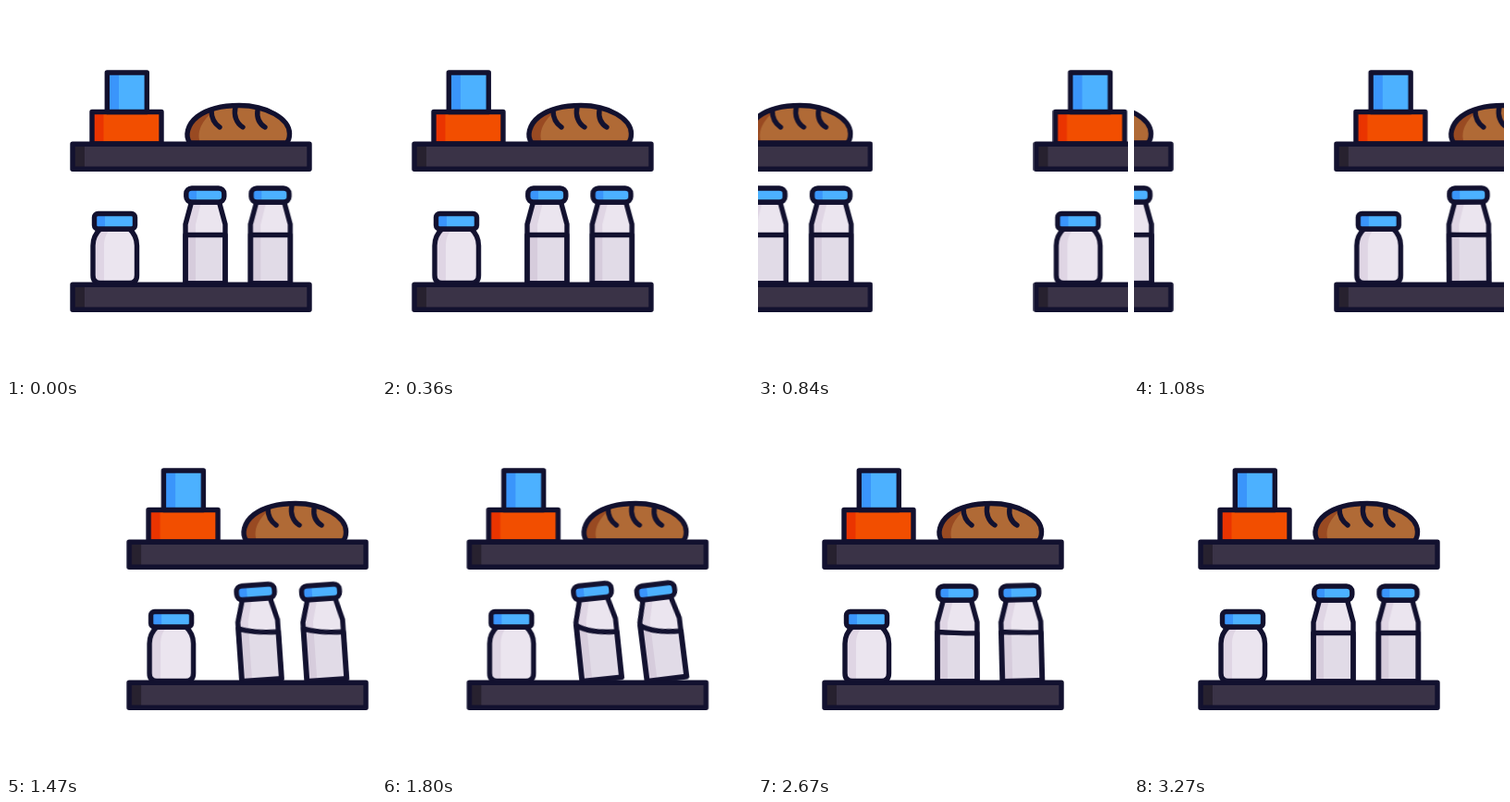
Animation of 400x400 px, one loop 4330 ms. Source, as an HTML page:

```html
<!DOCTYPE html>
<html lang="en">
<head>
<meta charset="utf-8">
<title>Pantry shelves</title>
<style>
  html, body { margin: 0; width: 100%; height: 100%; overflow: hidden; background: #fff; }
  svg { display: block; width: 100%; height: 100%; }

  .ink { stroke: #12112f; stroke-width: 5.4; stroke-linejoin: round; stroke-linecap: round; }
  .line { fill: none; }
  .wood { fill: #3a3347; }
  .wood-shade { fill: #27212f; }
  .blue { fill: #4cb1ff; }
  .blue-shade { fill: #3a95fb; }
  .orange { fill: #f24e00; }
  .orange-shade { fill: #ea3400; }
  .crust { fill: #b06a36; }
  .crust-shade { fill: #994a22; }
  .glass { fill: #ebe5ef; }
  .glass-shade { fill: #6a3a70; fill-opacity: .09; }
  .milk { fill: #e1dbe7; }

  #track { animation: slide 4330ms cubic-bezier(.333, 0, .3, 1) infinite; }
  .tilt { transform-origin: 193px 300px; }
  .tilt, .milk, .surface {
    animation: 4330ms cubic-bezier(.333, 0, .667, 1) infinite;
  }
  .first .tilt { animation-name: lean-first; }
  .second .tilt { animation-name: lean-second; }
  .milk, .surface { animation-name: slosh; }

  @keyframes slide {
    0% { transform: translateX(0); }
    55.43%, 100% { transform: translateX(-435px); }
  }
  @keyframes lean-first {
    0%, 22.17% { transform: rotate(0deg); }
    41.57% { transform: rotate(-6deg); }
    63.51%, 100% { transform: rotate(0deg); }
  }
  @keyframes lean-second {
    0%, 22.17% { transform: rotate(0deg); }
    45.27% { transform: rotate(-7.6deg); }
    68.13%, 100% { transform: rotate(0deg); }
  }
  @keyframes slosh {
    0%, 22.17% { d: path("M194 247.5Q210 247.5 237 247.5V300H194Z"); }
    43.88% { d: path("M194 239Q208 249.5 237 250.5V300H194Z"); }
    66.97%, 100% { d: path("M194 247.5Q210 247.5 237 247.5V300H194Z"); }
  }
</style>
</head>
<body>
<svg viewBox="0 0 400 400">
  <g id="track">
    <g id="shelves">
      <!-- boxes -->
      <path class="orange" d="M93 114.5h75V149H93z"/>
      <path class="orange-shade" d="M93 114.5h12.5V149H93z"/>
      <path class="ink line" d="M93 114.5h75V149H93z"/>
      <path class="blue" d="M109.3 72h43v42.5h-43z"/>
      <path class="blue-shade" d="M109.3 72H122v42.5h-12.7z"/>
      <path class="ink line" d="M109.3 72h43v42.5h-43z"/>

      <!-- bread -->
      <path class="crust" d="M199 148C193 141 196 128 207 119.500C219 110.500 236 107.500 252 107.500C282 107.500 306.500 122 306.500 138C306.500 142 305.500 146 303 148Z"/>
      <path class="crust-shade" d="M199 148C193 141 196 128 207 119.500C214 114.500 221 111.500 229 110C214 121 205 134 210 148Z"/>
      <path class="ink line" d="M199 148C193 141 196 128 207 119.500C219 110.500 236 107.500 252 107.500C282 107.500 306.500 122 306.500 138C306.500 142 305.500 146 303 148Z"/>
      <path class="ink line" d="M222 112.500C222 121 225 127 231 131M248 109.500C246 118 249 127 256 131M272 112.500C271 120 273.500 127 280 131"/>

      <!-- jar -->
      <path class="glass" d="M102 241C96.500 246 94 252 94 259V291Q94 299.500 102 299.500H133.500Q141.500 299.500 141.500 291V259C141.500 252 139 246 133.500 241Z"/>
      <path class="glass-shade" d="M102 241C96.500 246 94 252 94 259V291Q94 299.500 102 299.500H106V259C106 252 108 246 113 241Z"/>
      <path class="ink line" d="M102 241C96.500 246 94 252 94 259V291Q94 299.500 102 299.500H133.500Q141.500 299.500 141.500 291V259C141.500 252 139 246 133.500 241Z"/>
      <rect class="blue" x="95.500" y="224.500" width="44" height="16.500" rx="4"/>
      <path class="blue-shade" d="M107 224.500H98Q95.500 225 95.500 229V237Q95.500 241 99 241H107Z"/>
      <rect class="ink line" x="95.500" y="224.500" width="44" height="16.500" rx="4"/>

      <!-- bottle -->
      <g class="first">
        <g class="tilt">
          <path class="glass" d="M200.500 212L194 236V300H237V236L230.500 212Z"/>
          <path class="milk" d="M194 247.500Q210 247.500 237 247.500V300H194Z"/>
          <path class="glass-shade" d="M200.500 212L194 236V300H205V236L211 212Z"/>
          <path class="ink line surface" d="M194 247.500Q210 247.500 237 247.500V300H194Z"/>
          <path class="ink line" d="M200.500 212L194 236V300H237V236L230.500 212Z"/>
          <rect class="blue" x="194.800" y="197" width="41" height="15" rx="6"/>
          <path class="blue-shade" d="M206 197h-5a7.500 7.500 0 0 0 0 15h5z"/>
          <rect class="ink line" x="194.800" y="197" width="41" height="15" rx="6"/>
        </g>
      </g>

      <!-- boards -->
      <g id="board">
        <path class="wood" d="M72 149.300H328V176.300H72Z"/>
        <path class="wood-shade" d="M72 149.300H85V176.300H72Z"/>
        <path class="ink line" d="M72 149.300H328V176.300H72Z"/>
      </g>
    </g>
  </g>
</svg>
<script>
  const copy = (node, x, y) => {
    const twin = node.cloneNode(true);
    twin.removeAttribute('id');
    twin.setAttribute('transform', `translate(${x} ${y})`);
    node.after(twin);
    return twin;
  };
  const find = selector => document.querySelector(selector);

  copy(find('.first'), 70.3, 0).setAttribute('class', 'second');
  copy(find('#board'), 0, 152);
  copy(find('#shelves'), 435, 0);
</script>
</body>
</html>
```
